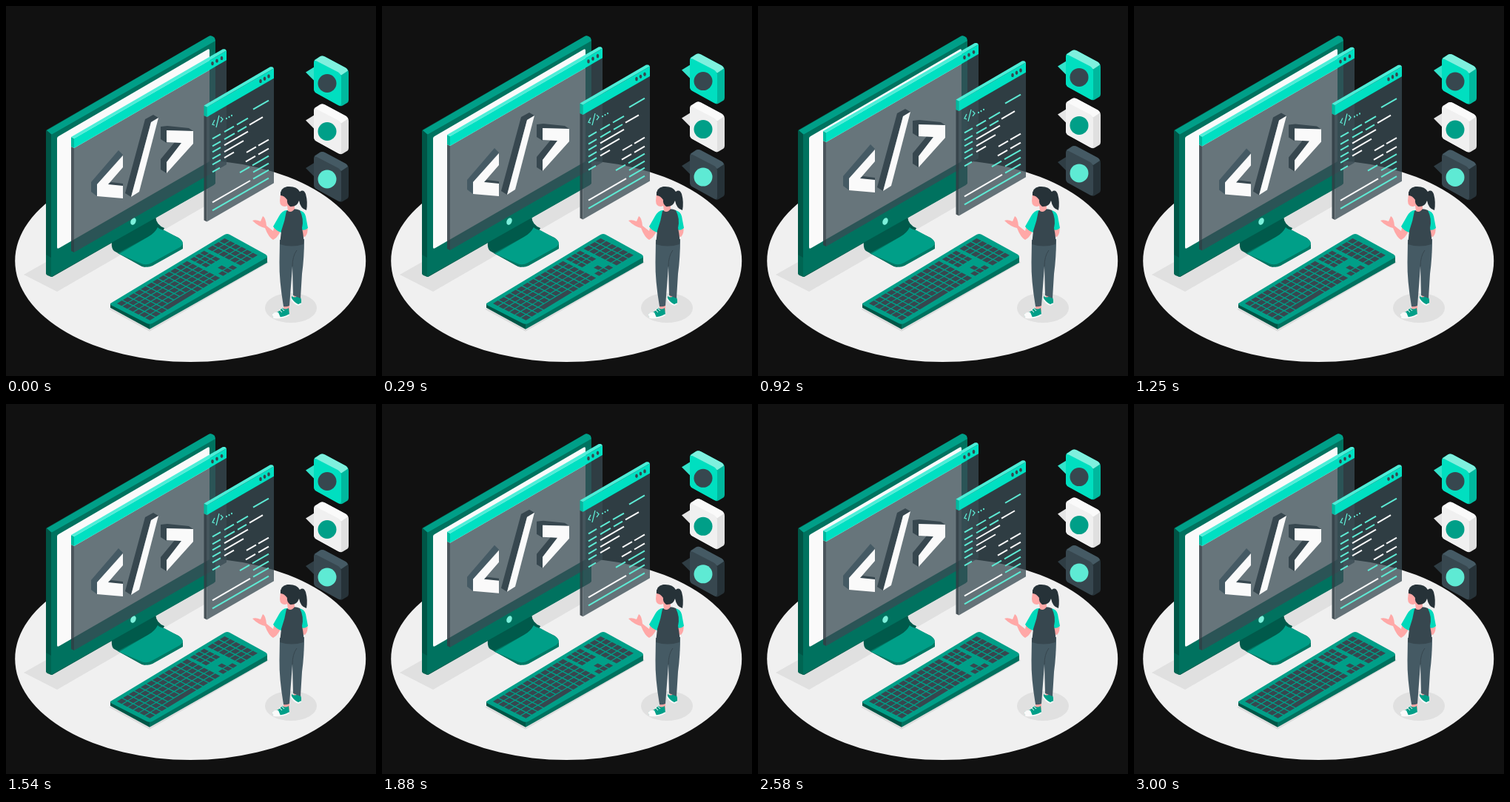
An HTML page that plays this animation: 500x500 px, repeating every 3.04 s.

```html
<!DOCTYPE html>
<html lang="en">
<head>
<meta charset="utf-8">
<title>Isometric coding scene</title>
<style>
html, body { margin: 0; width: 100%; height: 100%; overflow: hidden; background: #111; }
svg { display: block; width: 100%; height: 100%; }
</style>
</head>
<body>
<svg viewBox="0 0 500 500">
  <ellipse cx="249.2" cy="344.4" rx="237" ry="136.6" fill="#f0f0f0"/>
  <path d="M24 363L69 386L268 271V225Z" fill="#e0e0e0"/>

  <!-- stand -->
  <path d="M143 318L202 284Q203 296 214 300L190 352Q186 354 180 350L146 331Q142 328 143 318Z" fill="#005a4b"/>
  <path d="M151 334L192 312L210 302L233 313Q243 320 236 328L239 322V328L198 351Q190 355 181 350Z" fill="#007965"/>
  <path d="M153 335L192 312Q201 307 205 299Q208 302 214 303L234 314Q243 320 235 326L197 347Q190 351 183 348Z" fill="#009f88"/>

  <!-- monitor -->
  <g stroke-linejoin="round">
    <path d="M56 169L276 42L281 46L281 239L62 364L56 361Z" fill="#005546" stroke="#005546" stroke-width="4"/>
    <path d="M54 336L61 340V366L56 364Q54 363 54 360Z" fill="#006552"/>
    <path d="M55 168L274 41Q278 39 282 43L283 48L62 174Z" fill="#009f88"/>
    <path d="M61 174L283 47V238Q283 241 279 243L61 366Z" fill="#00725f"/>
  </g>
  <path d="M69 179Q69 177 71 176L272 59Q275 57 275 60V210L72 327Q69 329 69 326Z" fill="#fafafa"/>
  <ellipse cx="172" cy="291" rx="3.4" ry="5" transform="rotate(25 172 291)" fill="#7df0db"/>

  <!-- keyboard -->
  <g transform="translate(0 .7)">
    <path d="M139 409L194 439L355 346L350 340Z" fill="#dcdcdc"/>
    <path d="M141 401V407L194 436V428Z" fill="#005546"/>
    <path d="M194 428V436L353 346V338Z" fill="#00705e"/>
    <path d="M143 400L294 309Q298 306 302 308L351 335Q355 338 351 340L198 428Q194 430 190 428L143 404Q139 402 143 400Z" fill="#009f88"/>
    <g id="keys" fill="#37474f" transform="matrix(1.57 -.95 .53 .27 141 402)"></g>
  </g>

  <g id="float"></g>

  <!-- person -->
  <ellipse cx="385" cy="408" rx="35" ry="20" fill="#e0e0e0"/>
  <path d="M389 388H397V396H389ZM375 402H383V413H375Z" fill="#ffa8a7"/>
  <path d="M386 392Q391 396 397 390L399 397V402Q396 406 392 403L386 396Z" fill="#009f88"/>
  <path d="M385 395Q389 402 395 404L399 402" fill="none" stroke="#fafafa" stroke-width="1.8"/>
  <path d="M360 416Q369 414 373 408Q378 411 382 408L383 417Q377 421 368 422Q359 422 360 416Z" fill="#009f88"/>
  <path d="M360 416Q364 413 368 414L371 421Q359 424 360 416Z" fill="#fafafa"/>
  <path d="M361 421Q373 423 383 417" fill="none" stroke="#fafafa" stroke-width="1.6"/>
  <path d="M369 410L373 414M372 408L376 412" stroke="#fafafa"/>
  <path d="M370 316L403 315Q403 340 400 362L398 395L388 391L387 352L383 405Q379 407 375 406Q369 370 369.500 346Z" fill="#455a64"/>
  <path d="M387 352Q387 338 393 330" fill="none" stroke="#37474f"/>
  <path d="M400 298L407 297Q409 307 404 312L399 311Z" fill="#ffa8a7"/>
  <path d="M363 296L371 304Q367 313 361 316Q355 313 350 300Q341 298 333 290Q337 288 344 291L347 284Q351 286 352 297L361 304Z" fill="#ffa8a7"/>
  <path d="M396 276Q403 277 405 284L408 300Q404 304 399 302Z" fill="#00d9bb"/>
  <path d="M381 276Q374 275 369 284L361 298Q365 304 372 306L379 293Z" fill="#00d9bb"/>
  <path d="M379 277Q389 272 397 276Q403 288 400 300Q403 314 402 322Q386 327 370 322L372 304Q377 290 379 277Z" fill="#37474f"/>
  <path d="M371 254L370 263Q370 271 377 271L380 270L381 277Q386 280 390 274L389 255Z" fill="#ffa8a7"/>
  <path d="M371 256Q370 246 380 244Q393 243 397 251Q402 247 405 254Q408 265 406 276Q398 274 396 263Q393 272 384 271Q379 267 380 262Q376 256 371 256Z" fill="#263238"/>
</svg>
<script>
const SLOPE = 0.577, LIGHT = '#fafafa', MINT = '#5eead4', SLATE = '#37474f';
const $ = id => document.getElementById(id);
const poly = (points, fill) => `<polygon points="${points}" fill="${fill}"/>`;
const dot = (x, y, rx, ry, fill) => `<ellipse cx="${x}" cy="${y}" rx="${rx}" ry="${ry}" fill="${fill}"/>`;

// Keys in percent of the keyboard's two sides.
function keys() {
  let out = '';
  const key = (x, row, w) => {
    out += `<rect x="${x}" y="${8 + row * 14.4}" width="${w - 0.9}" height="12"/>`;
  };
  for (let row = 0; row < 6; row++) {
    for (let col = 0; col < 12; col++) {
      if (row < 5 || col < 3 || col > 7) key(3 + col * 5.1, row, 5.1);
    }
    for (let col = 0; col < 3; col++) {
      if (row < 3 || row === 5 || (row === 4 && col === 1)) key(66 + col * 4.3, row, 4.3);
      key(81 + col * 5.2, row, 5.2);
    }
  }
  key(18.3, 5, 25.5);
  return out;
}

// Glass pane: front edge from x to r, heights given at x.
function pane(x, r, top, head, bottom, dots) {
  const drop = (r - x) * SLOPE, back = x - 4;
  const band = (a, b) => [x, a, r, a - drop, r, b - drop, x, b];
  return poly(band(head, bottom), 'rgba(57,75,84,.76)') +
    poly([back, head - 2, x, head, x, bottom, back, bottom - 2], 'rgba(50,62,69,.88)') +
    poly([back, top - 2, x, top, x, head, back, head - 2], '#00b89e') +
    poly(band(top, head), '#00e0c2') +
    poly([back, top - 2, r - 5, top - drop - 2, r - 2, top - drop - 2, r, top - drop, x, top], '#4deed8') +
    dots.map(d => dot(d, (top + head) / 2 - (d - x) * SLOPE, 1.8, 2.7, SLATE)).join('');
}

function bigTag() {
  return poly('115,238 152,195 158,201 123,241 123,257 115,251', '#455a64') +
    poly('137,241 142,238 158,240 158,244', SLATE) +
    poly('123,241 158,202 158,218 138,241 158,243 158,260 123,257', LIGHT) +
    poly('188,153 199,147 206,151 196,157 169,258 161,253', SLATE) +
    poly('196,157 206,151 180,251 169,258', LIGHT) +
    poly('209,163 218,162 247,165 253,169 217,168 217,185 209,180', SLATE) +
    poly('209,207 228,184 237,185 217,211 217,226 209,221', SLATE) +
    poly('217,168 253,169 253,186 217,226 217,211 237,185 217,184', LIGHT);
}

// Each row: height at the left margin, then colour and span of its strokes.
const rows = [
  [172, 'm', 334, 355],
  [180, 'm', 279, 290, 'm', 295, 308, 'm', 312, 327],
  [190, 'm', 279, 290, 'm', 295, 309, 'm', 313, 325, 'w', 329, 347],
  [198, 'm', 279, 290, 'w', 295, 327],
  [207, 'm', 279, 290, 'w', 295, 321],
  [215, 'm', 279, 290, 'w', 295, 308],
  [225, 'm', 279, 289, 'w', 325, 338, 'w', 341, 355],
  [237, 'w', 324, 337, 'w', 341, 355],
  [247, 'm', 316, 329, 'm', 333, 355],
  [257, 'm', 334, 355],
  [266, 'w', 279, 330, 'm', 334, 355],
  [277, 'm', 279, 355]
];
function code() {
  let out = `<path d="M282 154L279 160L282 161M288 148L284 164M290 150L293 153L290 157" fill="none" stroke="${MINT}" stroke-width="1.3"/>`;
  for (const x of [298, 301.5, 305]) out += dot(x, 152 - (x - 298) * SLOPE, 1, 1.2, MINT);
  for (const [y, ...parts] of rows) {
    for (let i = 0; i < parts.length; i += 3) {
      const [c, a, b] = parts.slice(i, i + 3);
      const at = x => y - (x - 278) * SLOPE;
      out += `<path d="M${a} ${at(a)}L${b} ${at(b)}" stroke="${c === 'm' ? MINT : LIGHT}" stroke-width="2"/>`;
    }
  }
  return out;
}

function tile(y, front, top, side, tail, mark) {
  return `<g transform="translate(0 ${y})">
    <path d="M405 22L418 14V35Z" fill="${tail}"/>
    <path d="M416 9Q416 5 419 4L424 1Q427 -1 431 1L459 16Q463 18 463 23V59Q463 63 460 64L455 67Q452 69 448 66L419 50Q416 48 416 44Z" fill="${side}"/>
    <path d="M417 6L424 1Q427 -1 431 1L459 16Q461 17 462 20L453 26L418 8Z" fill="${top}"/>
    <path d="M416 10Q416 5 420 7L449 22Q453 25 453 29V64Q453 69 448 66L419 50Q416 48 416 44Z" fill="${front}"/>
    <circle cx="434" cy="37" r="12.5" fill="${mark}"/></g>`;
}

$('keys').innerHTML = keys();
$('float').innerHTML =
  pane(92, 298, 179, 192, 333, [279, 285, 291.5]) + bigTag() +
  pane(271.5, 362, 136.5, 150, 291.5, [344, 349.5, 355]) + code() +
  tile(67.5, '#00dfc0', '#7ff0de', '#00b89e', '#33e3cb', SLATE) +
  tile(132.5, '#f0f0f0', '#fafafa', '#e0e0e0', '#e4e4e4', '#009f88') +
  tile(197, SLATE, '#455a64', '#263238', '#2f3d44', MINT);

// Two bobs per 3040 ms loop.
function draw() {
  const phase = performance.now() % 1520 / 1520;
  const rise = 4.5 * (1 - Math.cos(2 * Math.PI * phase));
  $('float').setAttribute('transform', `translate(0 ${-rise})`);
  requestAnimationFrame(draw);
}
draw();
</script>
</body>
</html>
```
